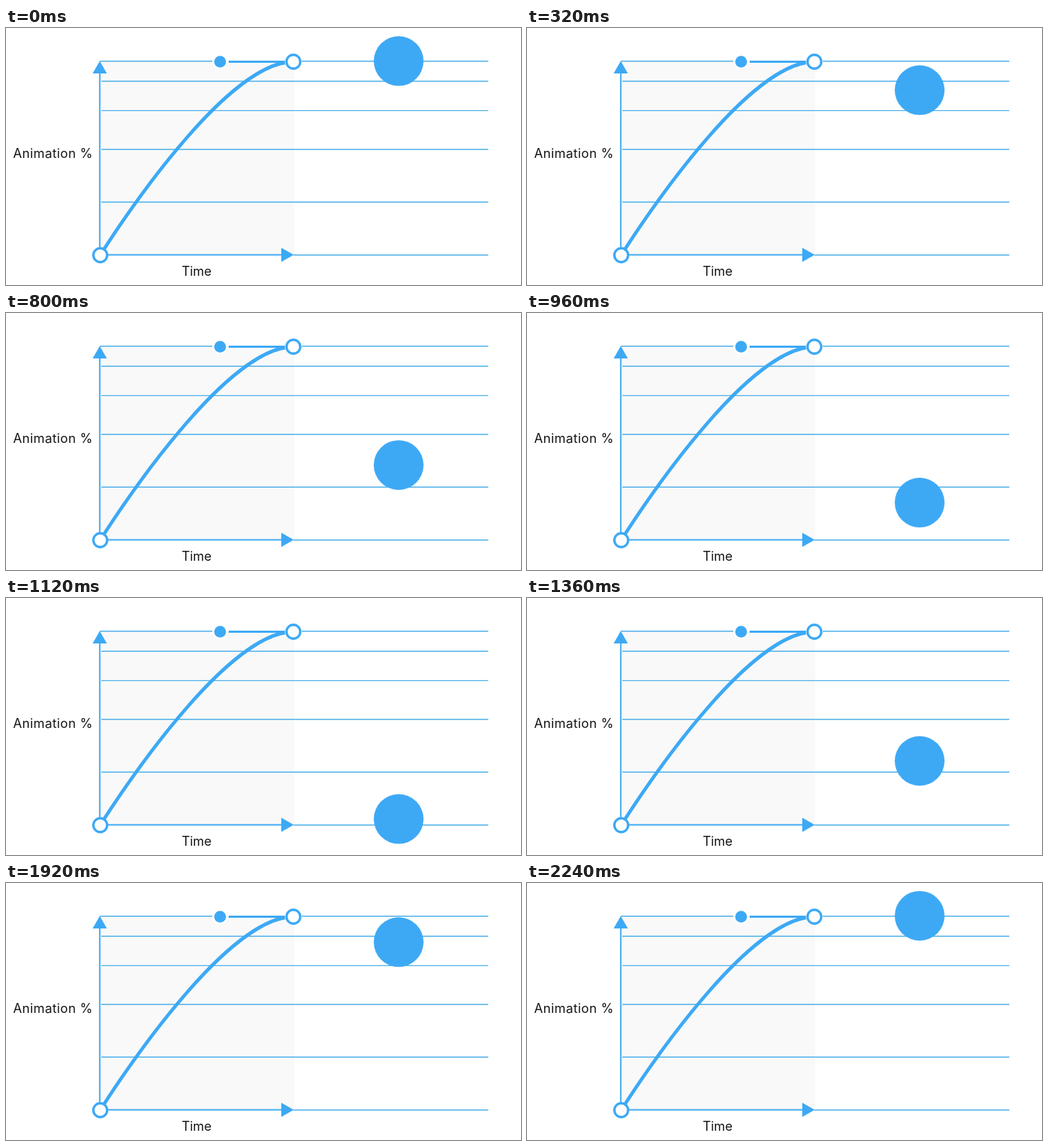
Recreate the animation shown at these times as an HTML page. Size 724 by 362 pixels, loop 2280 ms.

```html
<!DOCTYPE html>
<html lang="en">
<head>
<meta charset="utf-8">
<title>Ease-out curve</title>
<style>
  html, body { margin: 0; width: 100%; height: 100%; overflow: hidden; background: #fff; }
  svg { display: block; width: 724px; height: 362px; }
  text { font: 18px Inter, "Open Sans", sans-serif; fill: #161616; }
  .grid { fill: none; stroke: #49aee9; stroke-width: 1.4; }
  .axis { fill: none; stroke: #3da9f5; stroke-width: 2; }
  .solid { fill: #3da9f5; }
  .knob { fill: #fff; stroke: #3da9f5; stroke-width: 3.4; }
</style>
</head>
<body>
<svg viewBox="0 0 724 362">
  <rect x="132" y="47" width="273" height="273" fill="#f9f9f9"/>
  <path class="grid" d="M132 46.8H290M416 46.8H678M134 75H678M134 116.4H678M134 171H678M134 245.3H678M404 319.8H678"/>
  <path class="axis" d="M131.8 320V60M132 319.5H390"/>
  <path class="solid" d="M131.8 46.5L141.8 64H121.8ZM404.5 319.5L387 329.5V309.5Z"/>
  <circle cx="301" cy="47.5" r="11" fill="#fff"/>
  <circle class="solid" cx="301" cy="47.5" r="8.3"/>
  <path d="M313 47.5H394" fill="none" stroke="#3da9f5" stroke-width="2.8"/>
  <path d="M132.5 320C132.5 320 301 47.5 404 47.5" fill="none" stroke="#3da9f5" stroke-width="4.8"/>
  <circle cx="404" cy="47.5" r="12" fill="#fff"/>
  <circle class="knob" cx="404" cy="47.5" r="9.7"/>
  <circle class="knob" cx="132.5" cy="320" r="9.7"/>
  <text x="10" y="183" letter-spacing=".4">Animation %</text>
  <text x="268" y="349" text-anchor="middle">Time</text>
  <circle id="ball" class="solid" cx="552" cy="46.6" r="35"/>
</svg>
<script>
  const LOOP = 2280, STEP = 40;
  const TOP = 46, BOTTOM = 319.5;
  const FALL = { from: -35, to: 1105 };
  const RISE = { from: 1098, to: 2260 };
  const ball = document.getElementById('ball');

  // cubic-bezier(0, 0, .62, 1)
  function easeOut(x) {
    let lo = 0, hi = 1;
    for (let i = 0; i < 24; i++) {
      const u = (lo + hi) / 2;
      if (1.86 * (1 - u) * u * u + u ** 3 < x) lo = u; else hi = u;
    }
    return 3 * (1 - lo) * lo * lo + lo ** 3;
  }

  const progress = (leg, t) =>
    Math.min(1, Math.max(0, (t - leg.from) / (leg.to - leg.from)));

  // The fall is the rise played backwards.
  function ballY(t) {
    const x = t < 1100 ? 1 - progress(FALL, t) : progress(RISE, t);
    return BOTTOM + (TOP - BOTTOM) * easeOut(x);
  }

  const start = performance.now();
  function draw(now) {
    const t = Math.max(0, now - start) % LOOP;
    ball.setAttribute('cy', ballY(Math.floor(t / STEP) * STEP).toFixed(2));
    requestAnimationFrame(draw);
  }
  draw(start);
</script>
</body>
</html>
```
